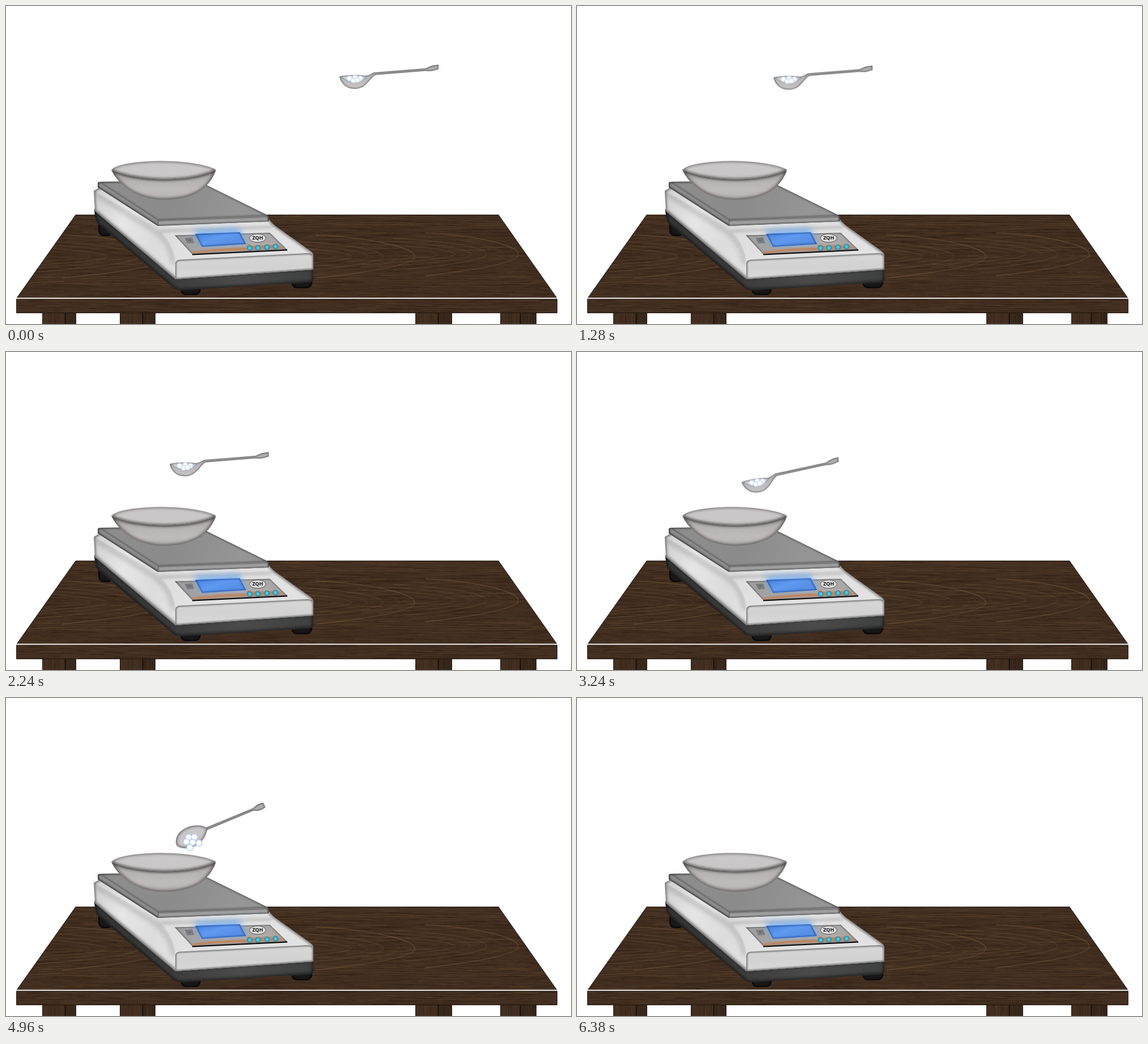
An HTML page with a canvas for the animation above (7.72 s loop, 998x561 px).

```html
<!DOCTYPE html>
<html lang="en">
<head>
<meta charset="utf-8">
<title>Weighing on a balance</title>
<style>
html, body { margin: 0; width: 100%; height: 100%; overflow: hidden; background: #fff; }
canvas { display: block; width: 998px; height: 561px; }
</style>
</head>
<body>
<canvas id="stage" width="998" height="561"></canvas>
<script>
const W = 998, H = 561, LOOP = 7720, STEP = 40;
const stage = document.getElementById('stage').getContext('2d');

function layer() {
  const c = document.createElement('canvas');
  c.width = W;
  c.height = H;
  return c;
}

let seed = 11;
function rnd() {
  seed = (seed * 16807) % 2147483647;
  return seed / 2147483647;
}

function gradient(g, x0, y0, x1, y1, ...colors) {
  const fill = g.createLinearGradient(x0, y0, x1, y1);
  colors.forEach((c, i) => fill.addColorStop(i / (colors.length - 1), c));
  return fill;
}

// Filled path with a soft dark inner edge.
function solid(g, d, fill, edge = 'rgba(0,0,0,.5)', width = 4, blur = 2) {
  const p = new Path2D(d);
  g.save();
  g.fillStyle = fill;
  g.fill(p);
  g.clip(p);
  g.filter = `blur(${blur}px)`;
  g.strokeStyle = edge;
  g.lineWidth = width;
  g.stroke(p);
  g.restore();
}

function line(g, d, color, width = 1, blur = 0) {
  g.save();
  if (blur) g.filter = `blur(${blur}px)`;
  g.strokeStyle = color;
  g.lineWidth = width;
  g.stroke(new Path2D(d));
  g.restore();
}

function grain(g, x, y, w, h, upright) {
  const count = w * h / 48;
  for (let i = 0; i < count; i++) {
    const len = 8 + rnd() * 55;
    const a = x + rnd() * w, b = y + rnd() * h;
    g.fillStyle = rnd() < 0.5
      ? `rgba(28,17,10,${0.08 + rnd() * 0.22})`
      : `rgba(112,84,54,${0.06 + rnd() * 0.18})`;
    if (upright) g.fillRect(a, b - len / 2, 1, len);
    else g.fillRect(a - len / 2, b, len, 1);
  }
}

// Nested arches of the wood figure, rounded tips pointing right.
function arches(g, tip, mid, reach) {
  for (let i = 0; i < 6; i++) {
    const x = tip - i * 28, s = 38 - i * 5;
    g.strokeStyle = `rgba(138,106,70,${i % 2 ? 0.2 : 0.4})`;
    g.lineWidth = i % 3 ? 0.9 : 1.4;
    g.beginPath();
    g.moveTo(x - reach, mid - s);
    g.bezierCurveTo(x - reach * 0.5, mid - s * 0.9, x, mid - s * 0.45, x, mid);
    g.bezierCurveTo(x, mid + s * 0.4, x - reach * 0.5, mid + s * 0.75, x - reach, mid + s);
    g.stroke();
  }
}

function wood(g, d, x, y, w, h, upright) {
  const p = new Path2D(d);
  g.save();
  g.fillStyle = '#412e20';
  g.fill(p);
  g.clip(p);
  grain(g, x, y, w, h, upright);
  if (h > 100) {
    arches(g, 722, 442, 175);
    arches(g, 905, 438, 165);
    arches(g, 290, 442, 190);
    for (let i = 0; i < 9; i++) {
      const v = 374 + i * 4 + (i > 4 ? 82 : 0);
      line(g, `M20 ${v + 6}C200 ${v - 9} 350 ${v + 15} 530 ${v}S820 ${v + 12} 980 ${v - 3}`,
        'rgba(126,96,64,.24)', 0.9);
    }
  }
  g.restore();
  line(g, d, '#1c120b', 0.9);
}

const box = (x, y, w, h) => `M${x} ${y}h${w}v${h}h${-w}z`;

function drawTable(g) {
  for (const [x, w, side] of [[64, 60, 40], [201, 63, 40], [723, 65, 40], [873, 64, 35]]) {
    wood(g, box(x + .5, 540.5, w - 1, 30), x, 540, w, 24, true);
    g.fillStyle = 'rgba(0,0,0,.14)';
    g.fillRect(x + side, 542, w - side, 19);
    line(g, `M${x + side + .5} 542V561`, '#0c0704', 1.3);
  }
  wood(g, 'M123 368.5H870L973 515H19Z', 19, 368, 955, 148);
  g.fillStyle = '#fff';
  g.fillRect(18, 514.6, 956, 2);
  wood(g, box(18.5, 517, 955, 24.5), 18, 517, 956, 25);
}

function drawScale(g) {
  const foot = (x, y, w, h) =>
    solid(g, `M${x} ${y}h${w}v${h - 9}q-2 9-11 9h${22 - w}q-9 0-11-9z`, '#171717', '#000', 3, 1.5);
  foot(163, 382, 26, 24);
  foot(308, 492, 36, 18);
  foot(504, 480, 37, 18);

  solid(g, 'M156 358L299 478L543 462V482Q543 487 537 487.5L311 501.5Q302 502 297 498L164 386Q157 380 156 358Z',
    gradient(g, 160, 0, 545, 0, '#343434', '#3b3b3b', '#4b4b4b', '#3e3f3f'), 'rgba(0,0,0,.6)', 5, 2.4);

  // Housing, tucked under the plate
  solid(g, 'M155 326L172 316L268 376L464 376Q472 386 480 391L536 431Q543 435 543 442V465L299 482L157 362Z',
    gradient(g, 150, 340, 330, 420, '#cfcfcf', '#e6e6e6', '#dcdcdc', '#e2e2e2'), 'rgba(20,20,20,.6)', 4, 2);
  g.save();
  g.clip(new Path2D('M155 326L268 390Q296 420 299 450V482L157 362Z'));
  line(g, 'M153 328L262 396Q292 418 296 455', 'rgba(110,110,110,.35)', 7, 4);
  line(g, 'M158 363L299 482', 'rgba(60,60,60,.4)', 6, 3);
  g.restore();
  line(g, 'M272 397L470 390', 'rgba(90,90,90,.3)', 4, 2.5);

  // Front face
  solid(g, 'M299 482V455Q299 448 307 447.5L532 436Q543 436 543 443V465Z',
    gradient(g, 0, 440, 0, 480, '#d6d6d6', '#d2d2d2', '#d8d8d8'), 'rgba(20,20,20,.65)', 3, 1.7);

  // Weighing plate
  solid(g, 'M162 312Q163 310 168 310L330 308Q338 308 344 311L464 370V380L268 388L162 320Z',
    '#8a8a8a', 'rgba(0,0,0,.65)', 3.5, 1.6);
  solid(g, 'M165 311L330 308Q338 308 344 311L463 370L268 378Z',
    gradient(g, 180, 310, 400, 385, '#8d8d8d', '#8b8b8b', '#959595'), 'rgba(35,35,35,.5)', 3, 1.6);
  solid(g, 'M268 378L463 371V380L268 387.5Z', '#9e9e9e', 'rgba(20,20,20,.6)', 2, 1);
}

function drawPanel(g) {
  const plate = 'M298 404.5L466 400L497 430L329 438Z';
  solid(g, plate, gradient(g, 300, 404, 490, 435, '#9c9c9d', '#b0aeae', '#a6a5a4'),
    'rgba(30,30,30,.6)', 2, .8);
  g.save();
  g.clip(new Path2D(plate));
  g.filter = 'blur(1.2px)';
  g.fillStyle = '#c0835a';
  g.fill(new Path2D('M328 434Q375 426 426 426L424 431Q375 431 329 437Z'));
  g.fill(new Path2D('M426 421L470 418L492 427L425 431Z'));
  g.fillStyle = '#b0aeae';
  g.fill(new Path2D('M430 419L469 417L480 421L432 423Z'));
  g.restore();
  line(g, 'M329 438.5L497 430.5', '#050505', 2.2);
  solid(g, 'M316 409L329 408.5L332 418L320 418.5Z', '#85878a', '#666', 1.5, .8);
  solid(g, 'M320 411L326 410.7L328 415L322 415.5Z', '#6c7074', '#777', 1, .5);

  g.save();
  g.filter = 'blur(6px)';
  g.fillStyle = 'rgba(82,158,245,.65)';
  g.fill(new Path2D('M332 395L412 392L424 419L344 422Z'));
  g.restore();
  solid(g, 'M334 402L413 399L424 420L346 425Z',
    gradient(g, 360, 398, 370, 426, '#4c89e0', '#5f9af0', '#5790e6'), 'rgba(20,62,140,.7)', 3, 1.4);

  // Name badge
  g.fillStyle = '#dcdcdc';
  g.strokeStyle = '#555';
  g.lineWidth = 1;
  g.beginPath();
  g.ellipse(444.5, 409.5, 14.5, 7.4, 0, 0, 7);
  g.fill();
  g.stroke();
  g.fillStyle = '#161616';
  g.font = 'bold 9px "Open Sans", sans-serif';
  g.textAlign = 'center';
  g.textBaseline = 'middle';
  g.fillText('ZQH', 444.5, 410);

  for (const [x, y] of [[430.5, 427], [445, 426.5], [461, 425.5], [476, 424.5]]) {
    const fill = g.createRadialGradient(x, y, 1, x, y, 5);
    fill.addColorStop(0, '#46d2f2');
    fill.addColorStop(.65, '#27acd0');
    fill.addColorStop(1, '#275965');
    g.fillStyle = fill;
    g.beginPath();
    g.arc(x, y, 4.8, 0, 7);
    g.fill();
  }
}

function drawBowl(g) {
  solid(g, 'M186 289Q193 305 211 320Q239 342 281 342Q327 341 350 321Q366 306 371 289C325 312 230 310 186 289Z',
    gradient(g, 0, 295, 0, 342, '#aaa6a6', '#b8b4b4', '#bfbbbb', '#b5b1b1'), 'rgba(25,22,22,.6)', 5, 2.8);
  solid(g, 'M186 289Q196 278 243 274.5Q300 270.5 345 280Q364 284 371 289C325 312 230 310 186 289Z',
    '#c9c7c7', 'rgba(40,36,36,.55)', 3.5, 1.9);
  line(g, 'M188 290C230 310.5 325 312.5 369 290', 'rgba(45,42,42,.45)', 2.5, 1.5);
}

function ball(g, x, y, r) {
  const fill = g.createRadialGradient(x - r * .1, y - r * .1, r * .3, x, y, r);
  fill.addColorStop(0, '#fff');
  fill.addColorStop(.5, '#eaf4ff');
  fill.addColorStop(.78, 'rgba(170,198,240,.6)');
  fill.addColorStop(1, 'rgba(170,198,240,0)');
  g.fillStyle = fill;
  g.beginPath();
  g.arc(x, y, r, 0, 7);
  g.fill();
}

function drawSpoon(g) {
  solid(g, 'M589 124.5C600 121 622 121 636 123C643 122 647 117 653 117L741 110C747 108 748 105 764 103.5V111.5' +
    'C756 114 750 116 742 114.5L655 121.5C648 122 644 131 636 138C626 148 613 148 602 143C595 139 590 131 589 124.5Z',
    gradient(g, 0, 104, 0, 146, '#b0aeae', '#b8b6b6', '#c6c4c4'), 'rgba(25,25,25,.55)', 2.4, 1.2);
  const mouth = 'M591 125C602 121.5 625 121.5 638 124.5C634 132 623 135.5 613 135.5C603 134 596 130 591 125Z';
  solid(g, mouth, '#d9d9de', 'rgba(40,40,45,.55)', 2, 1);
  g.save();
  g.clip(new Path2D(mouth));
  for (const [x, y] of [[607, 128], [617, 126], [626, 128], [614, 132], [621, 131]]) ball(g, x, y, 6);
  g.restore();
}

function drawTipped(g) {
  solid(g, 'M352 229L436 194.5C441 191 443 187 454 184.5Q457 188 458 193C450 199 444 200 438 198.5L355 233Z',
    '#b0aeae', 'rgba(25,25,25,.6)', 2.4, 1.2);
  solid(g, 'M300 252C301 237 317 226 335 224.5C347 224 354 228 357 230C354 235 354 244 346 252' +
    'C336 263 322 267 310 264.5C302 263 299 258 300 252Z',
    '#cac7ca', 'rgba(30,30,32,.65)', 3.6, 1.9);
}

function bake(...parts) {
  const c = layer(), g = c.getContext('2d');
  parts.forEach(draw => draw(g));
  return c;
}

const scene = bake(drawTable, drawScale, drawPanel, drawBowl);
const spoon = bake(drawSpoon);
const tipped = bake(drawTipped);

// x, y, degrees at every 800 ms
const poses = [
  [0, 0, 0], [-155, -1, 0], [-300, 3.2, 0], [-300, 90.5, 0],
  [-300, 93.8, -7.4], [-300, 93, -13], [-300, 93, -19]
];
const PIVOT = [675, 117];
const pellets = [[323, 246], [333, 245.5], [319, 254], [330, 255], [341, 256], [325, 264]];
const aboveLip = new Path2D('M186 0V289C230 310 325 312 371 289V0Z');

function render(ms) {
  const k = Math.floor(ms / STEP);
  stage.fillStyle = '#fff';
  stage.fillRect(0, 0, W, H);
  stage.drawImage(scene, 0, 0);
  if (ms >= 6380) return;

  if (k < 120) {
    const i = Math.floor(k / 20), f = k % 20 / 20;
    const [x, y, deg] = poses[i].map((v, j) => v + (poses[i + 1][j] - v) * f);
    stage.save();
    stage.translate(PIVOT[0] + x, PIVOT[1] + y);
    stage.rotate(deg * Math.PI / 180);
    stage.drawImage(spoon, -PIVOT[0], -PIVOT[1]);
    stage.restore();
    return;
  }

  stage.drawImage(tipped, 0, 0);
  const n = k - 120;
  if (n >= 28) return;
  const dx = 1.8 - 0.45 * n, dy = -5 + n + 0.06 * n * n;
  stage.save();
  stage.clip(aboveLip);
  for (const [x, y] of pellets) ball(stage, x + dx, y + dy, 7);
  stage.restore();
}

const start = performance.now();
function tick() {
  render((performance.now() - start) % LOOP);
  requestAnimationFrame(tick);
}
render(0);
requestAnimationFrame(tick);
</script>
</body>
</html>
```
